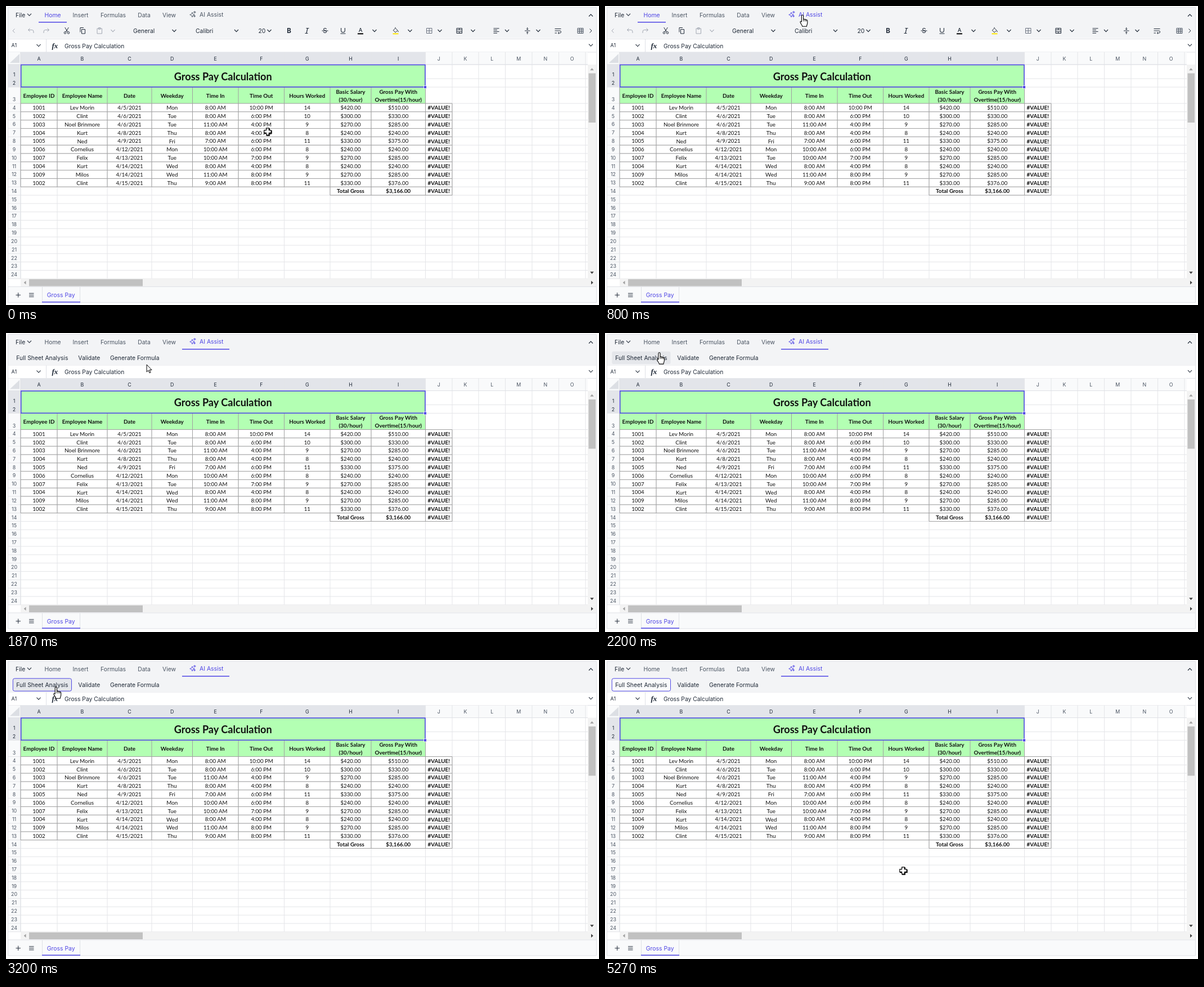
Recreate the animation shown at these times as an HTML page. Size 1054 by 531 pixels, loop 8 s.

```html
<!DOCTYPE html>
<html lang="en">
<head>
<meta charset="utf-8">
<title>Spreadsheet</title>
<style>
html, body { margin: 0; width: 100%; height: 100%; overflow: hidden; background: #fff; }
svg { display: block; width: 1054px; height: 531px; font-family: Inter, sans-serif; }
.cell { font-family: Lato, Carlito, sans-serif; }
</style>
</head>
<body>
<svg id="stage" viewBox="0 0 1054 531"></svg>
<script>
const NS = 'http://www.w3.org/2000/svg';
const INK = '#1f2937', TAB = '#4b5563', PALE = '#a3a8b3', ACCENT = '#4f46e5';
const BAR = '#f3f4f6', HEAD = '#f9fafb', ON = '#e3e5ea', EDGE = '#dfe1e6', GRID = '#e4e5e8', CELL = '#a0a0a0';
const LOOP = 8000;

function add(parent, tag, attrs, text) {
  const el = document.createElementNS(NS, tag);
  for (const k in attrs) el.setAttribute(k, attrs[k]);
  if (text !== undefined) el.textContent = text;
  parent.appendChild(el);
  return el;
}
const group = parent => add(parent, 'g', {});
const rect = (g, x, y, width, height, fill, more) => add(g, 'rect', { x, y, width, height, fill, ...more });
const line = (g, d, stroke = INK, w = 1, more) => add(g, 'path', { d, stroke, 'stroke-width': w, fill: 'none', ...more });
const fillPath = (g, d, fill) => add(g, 'path', { d, fill });
// y is the middle of the capitals
const label = (g, s, x, y, size, fill = INK, more) =>
  add(g, 'text', { x, y: y + size * 0.36, 'font-size': size, fill, ...more }, s);
const mid = { 'text-anchor': 'middle' };
const chevron = (g, x, y, color = INK) =>
  line(g, `M${x - 3.5} ${y - 1.8}l3.5 3.6 3.5-3.6`, color, 1.1);

const stage = document.getElementById('stage');
const sheet = group(stage);
const top_ = group(stage);
const homeBar = group(stage);
const aiBar = group(stage);

// ---- ribbon tabs
rect(top_, 3, 2, 1047, 55, BAR);
line(top_, 'M3.5 60V2.5H1049.5V60', EDGE);
label(top_, 'File', 17, 16, 10.4);
chevron(top_, 41.5, 15.5);
const homeTab = label(top_, 'Home', 83, 16, 10.4, TAB, mid);
[['Insert', 132.5], ['Formulas', 190.5], ['Data', 245.5], ['View', 290]]
  .forEach(([s, x]) => label(top_, s, x, 16, 10.4, TAB, mid));
const aiTab = group(top_);
label(aiTab, 'AI Assist', 344, 15, 10.4, 'inherit');
const star = (x, y, r) => {
  const k = r * 0.28;
  return `M${x} ${y - r}l${k} ${r - k} ${r - k} ${k} ${k - r} ${k} ${-k} ${r - k} ${-k} ${k - r} ${k - r} ${-k} ${r - k} ${-k}z`;
};
add(aiTab, 'path', { d: star(331, 15.5, 4.3) + star(335.3, 11, 2) + star(335, 18, 1.6), fill: 'none', stroke: 'currentColor', 'stroke-width': 0.9 });
const marker = rect(top_, 58, 28, 50, 1.5, ACCENT);
line(top_, 'M1036 18.5l3.5-3.6 3.5 3.6', INK, 1.1);

// ---- home toolbar
const h = homeBar;
line(h, 'M15.5 40.5l-3.5 3.5 3.5 3.5', PALE);
line(h, 'M42.5 39.5l-3 3 3 3M39.5 42.5h7q2.5 0 2.5 3.5v2', PALE);
line(h, 'M73.5 39.5l3 3-3 3M76.5 42.5h-7q-2.5 0-2.5 3.5v2', PALE);
line(h, 'M106.3 46.2l5-8.2M109.7 46.2l-5-8.2');
[105, 111].forEach(cx => add(h, 'circle', { cx, cy: 47.5, r: 1.8, fill: 'none', stroke: INK }));
line(h, 'M134.5 41.5h6v7.5h-6zM132 46.5v-8h6');
line(h, 'M162 40h8.5v9H162zM164.5 38.6h3.5v2.6h-3.5z', PALE);
chevron(h, 190, 44, PALE);
label(h, 'General', 226, 44, 10.4);
label(h, 'Calibri', 337, 44, 10.4);
label(h, '20', 448.5, 44, 10.4);
[299, 409.5, 468, 655, 718, 771, 830, 890.5, 946].forEach(x => chevron(h, x, 43.8));
label(h, 'B', 503, 43.7, 11.5, INK, { ...mid, 'font-weight': 700 });
line(h, 'M533.5 39.5h5M531.5 48.5h5M536 39.5l-2 9', INK, 1.2);
label(h, 'S', 567, 44, 11.5, INK, mid);
line(h, 'M561.5 44h11');
line(h, 'M595.6 39v4.3a3.4 3.4 0 0 0 6.8 0V39M594.5 49h9', INK, 1.1);
label(h, 'A', 630, 43, 9.5, INK, { ...mid, 'font-weight': 500 });
rect(h, 625, 48.3, 10, 2, '#000');
line(h, 'M688.3 43.3l3.8-4 4 4-4 3.6zM692 39.3v-1.5M697 44v2.2');
rect(h, 687.5, 48.3, 10, 2, '#ffe500');
line(h, 'M747.5 39.5h9.5v9h-9.5zM752.2 39.5v9M747.5 44h9.5', '#6b7280');
line(h, 'M801 39.5h9.5v9H801zM801 42.3h9.5M801 45.7h9.5M805.7 39.5v2.8M805.7 45.7v2.8');
line(h, 'M866.5 39.8h10M866.5 42.6h6.5M866.5 45.4h10M866.5 48.2h6.5');
line(h, 'M922 44h9.5M926.7 38v4M925 40.5l1.7 1.7 1.7-1.7M926.7 50v-4M925 47.5l1.7-1.7 1.7 1.7');
line(h, 'M975.5 40.5h11M975.5 44h9a2 2 0 0 1 0 4h-3M975.5 48h3.5M983 46.3l-1.8 1.7 1.8 1.7');
line(h, 'M1016 39.5h10v9h-10zM1016 42.5h10M1016 45.5h10M1019.5 39.5v9M1023 39.5v9', TAB);
line(h, 'M1037.5 40.5l3.5 3.5-3.5 3.5');

// ---- assistant toolbar
const button = rect(aiBar, 12.3, 32.8, 104.2, 22.4, 'none', { rx: 3 });
label(aiBar, 'Full Sheet Analysis', 18.3, 44, 10.4);
label(aiBar, 'Validate', 128.3, 44, 10.4);
label(aiBar, 'Generate Formula', 185, 44, 10.4);

// ---- formula bar
rect(sheet, 3, 58, 1047, 469, '#fff');
line(sheet, 'M3 58.5H1050M71.5 59V82M3 82H1050', EDGE);
label(sheet, 'A1', 9.5, 70, 9);
chevron(sheet, 58, 70);
add(sheet, 'text', { x: 81.5, y: 74.5, 'font-size': 13, fill: INK, 'font-style': 'italic', 'font-family': 'Liberation Serif, serif', 'font-weight': 700 }, 'fx');
label(sheet, 'Gross Pay Calculation', 104, 71, 10.3);
chevron(sheet, 1039.5, 69.5);

// ---- grid
const cols = [26, 91, 180, 259, 331.5, 413, 494.5, 576, 649, 745.5, 793, 840, 887.5, 935, 982.5, 1030];
const rows = [104, 129, 144];
for (let i = 0; i < 22; i++) rows.push(173 + i * 14.82);
const end = rows[24];
const centre = c => (cols[c] + cols[c + 1]) / 2;

rect(sheet, 3, 82, 1031, 22, HEAD);
rect(sheet, 3, 104, 23, end - 104, HEAD);
rect(sheet, 26, 82, 719.5, 22, ON);
rect(sheet, 3, 104, 23, 40, ON);
fillPath(sheet, 'M24 85V101H7z', '#dcdfe4');
cols.forEach(x => line(sheet, `M${x} 82V${end}`, GRID));
rows.forEach(y => line(sheet, `M3 ${y}H1034`, GRID));
line(sheet, `M26 82V${end}M3 104H1034`, EDGE);
for (let c = 0; c < 15; c++) label(sheet, 'ABCDEFGHIJKLMNO'[c], centre(c), 93.3, 8.9, c < 9 ? INK : TAB, mid);
for (let r = 0; r < 24; r++) label(sheet, r + 1, 14.5, rows[r + 1] - 7.2, 8.9, r < 2 ? INK : TAB, mid);

rect(sheet, 26, 104, 719.5, 69, '#b3ffb3');
line(sheet, `M26 144H745.5` + rows.slice(3, 14).map(y => `M26 ${y}H793`).join('') + `M576 ${rows[14]}H793`, CELL);
cols.slice(0, 11).forEach((x, c) =>
  line(sheet, `M${x} ${c > 9 ? 173 : 144}V${rows[c > 6 ? 14 : 13]}`, CELL));

const put = (s, c, y, bold, size = /^[\d$]/.test(s) ? 9.7 : 9.9) =>
  label(sheet, s, centre(c), y, size, '#111', { ...mid, class: 'cell', 'font-weight': bold ? 700 : 400 });
label(sheet, 'Gross Pay Calculation', 385.7, 125, 18.1, '#111', { ...mid, class: 'cell', 'font-weight': 700 });
['Employee ID', 'Employee Name', 'Date', 'Weekday', 'Time In', 'Time Out', 'Hours Worked']
  .forEach((s, c) => put(s, c, 159.3, true));
put('Basic Salary', 7, 152, true);
put('(30/hour)', 7, 166, true);
put('Gross Pay With', 8, 152, true);
put('Overtime(15/hour)', 8, 166, true);

const staff = `1001|Lev Morin|5|Mon|8|10 PM|14|420|510
1002|Clint|6|Tue|8|6 PM|10|300|330
1003|Noel Brinmore|6|Tue|11|4 PM|9|270|285
1004|Kurt|8|Thu|8|4 PM|8|240|240
1005|Ned|9|Fri|7|6 PM|11|330|375
1006|Cornelius|12|Mon|10|6 PM|8|240|240
1007|Felix|13|Tue|10|7 PM|9|270|285
1004|Kurt|14|Wed|8|4 PM|8|240|240
1009|Milos|14|Wed|11|8 PM|9|270|285
1002|Clint|15|Thu|9|8 PM|11|330|376`;
const show = [
  s => s, s => s, s => `4/${s}/2021`, s => s, s => `${s}:00 AM`,
  s => s.replace(' ', ':00 '), s => s, s => `$${s}.00`, s => `$${s}.00`
];
staff.split('\n').forEach((row, r) =>
  row.split('|').forEach((s, c) => put(show[c](s), c, rows[r + 3] + 7.7)));
for (let r = 3; r < 14; r++) put('#VALUE!', 9, rows[r] + 7.7, true);
put('Total Gross', 7, rows[13] + 7.7, true);
put('$3,166.00', 8, rows[13] + 7.7, true);

rect(sheet, 26.7, 104.5, 718.3, 39.3, 'none', { stroke: ACCENT, 'stroke-width': 1.6 });
rect(sheet, 742.5, 141.5, 5, 5, ACCENT, { stroke: '#fff', 'stroke-width': 0.8 });

// ---- scroll bars
rect(sheet, 1034, 104, 15.5, end - 104, '#f3f3f3');
rect(sheet, 26, end, 1023.5, 13.8, '#f3f3f3');
rect(sheet, 1035.5, 119.5, 12.5, 87.5, '#c1c1c1');
rect(sheet, 41, 485.2, 202, 12.3, '#c1c1c1');
fillPath(sheet, 'M1038.2 114.3l3.3-4 3.3 4zM35.5 488l-3.8 3.3 3.8 3.3z', '#a0a0a0');
fillPath(sheet, 'M1038.2 471.8l3.3 4 3.3-4zM1040 488l3.8 3.3-3.8 3.3z', '#404040');

// ---- sheet tabs
rect(sheet, 3, 498, 1047, 28.5, HEAD);
line(sheet, 'M3 498.5H1050M64.5 499V526M131.5 499V526', EDGE);
line(sheet, 'M17.5 513.3h8.4M21.7 509.1v8.4');
line(sheet, 'M41 510.3h8.5M41 513.3h8.5M41 516.3h8.5');
label(sheet, 'Gross Pay', 97.7, 513.3, 10.4, ACCENT, mid);
line(sheet, 'M3.5 58V526.5H1049.5V58', EDGE);
rect(sheet, 64, 525, 68, 1.5, ACCENT);

// ---- pointers
const outlined = (g, d, w = 1) =>
  add(g, 'path', { d, fill: '#fff', stroke: '#000', 'stroke-width': w, 'stroke-linejoin': 'round' });
const pointers = { hand: group(stage), cross: group(stage), arrow: group(stage) };
outlined(pointers.hand, 'M-1.6 1.6C-1.6-.6 1.6-.6 1.6 1.6V8C1.8 6.8 4 7 4.2 8.3 4.6 7.4 6.6 7.8 6.7 9 7.2 8.4 8.8 8.8 8.8 10.2V14C8.8 17 7.4 17.5 7.4 20.3H-.2C-.2 18-3.8 15-4 12.4-4 11-2.4 10.8-1.6 12.2Z', 1.1);
line(pointers.hand, 'M1.6 8v3.3M4.2 8.3v3M6.7 9v2.5', '#000', 0.9);
const plus = 'M-2.4-6.2h4.8v3.8h3.8v4.8h-3.8v3.8h-4.8v-3.8h-3.8v-4.8h3.8z';
add(pointers.cross, 'path', { d: plus, transform: 'translate(.9 .9)', stroke: '#000', 'stroke-width': 1.2 });
outlined(pointers.cross, plus, 1.2);
outlined(pointers.arrow, 'M0 0V13l3-2.8 2 4.6 2-.9-2-4.4H9z');

// each move: start, end, steps, then points as [share, x, y]
const moves = [
  [70, 800, 10, [[0, 465, 223], [.2, 452, 202], [.5, 404, 115], [.8, 358, 32], [1, 351, 16]]],
  [1670, 2330, 11, [[0, 351, 16], [.35, 255, 55], [.6, 165, 76], [.82, 96, 34.5], [1, 74, 44]]],
  [2600, 2600, 1, [[0, 74, 44], [1, 79, 45]]],
  [2870, 3670, 13, [[0, 79, 45], [.3, 84, 46], [.465, 89, 48], [.6, 170, 110], [.8, 420, 300], [.92, 532, 379], [1, 511, 380]]],
  [3800, 4000, 4, [[0, 511, 380], [1, 529, 373]]],
  [5270, 5270, 1, [[0, 529, 373], [1, 530, 374]]]
];

function along(points, p) {
  let i = 1;
  while (i < points.length - 1 && p > points[i][0]) i++;
  const [a, b] = [points[i - 1], points[i]];
  const k = Math.min(1, (p - a[0]) / (b[0] - a[0]));
  return [a[1] + (b[1] - a[1]) * k, a[2] + (b[2] - a[2]) * k];
}

function pointerAt(t) {
  let now = moves[0];
  for (const m of moves) if (t >= m[0]) now = m;
  const [t0, t1, n, points] = now;
  if (t < t0) return along(points, 0);
  const gap = n > 1 ? (t1 - t0) / (n - 1) : 1;
  const done = Math.min(n, Math.floor((t - t0 + 5) / gap) + 1);
  return along(points, done / n);
}

const visible = (el, on) => el.setAttribute('visibility', on ? 'visible' : 'hidden');

function draw(t) {
  const [x, y] = pointerAt(t);
  const ai = t >= 1470, settled = t >= 1530;
  const onTab = y < 30 && x > 313 && x < 398;
  const onButton = ai && x > 12 && x < 117 && y > 32 && y < 56;
  const kind = onTab || onButton ? 'hand' : y > 80 ? 'cross' : 'arrow';
  for (const k in pointers) visible(pointers[k], k === kind);
  pointers[kind].setAttribute('transform', `translate(${x} ${y})`);

  visible(homeBar, !ai);
  visible(aiBar, ai);
  sheet.setAttribute('transform', `translate(0 ${ai ? -1.5 : 0})`);
  homeTab.setAttribute('fill', ai ? TAB : ACCENT);
  const tint = settled || onTab ? ACCENT : TAB;
  aiTab.setAttribute('fill', tint);
  aiTab.setAttribute('color', tint);
  marker.setAttribute('x', settled ? 313 : ai ? 78 : 58);
  marker.setAttribute('width', settled ? 84 : ai ? 52 : 50);
  button.setAttribute('fill', onButton ? '#e5e7eb' : t >= 2870 ? '#f9fafb' : 'none');
  button.setAttribute('stroke', t >= 2870 ? ACCENT : 'none');
}

function tick() {
  draw(performance.now() % LOOP);
  requestAnimationFrame(tick);
}
tick();
</script>
</body>
</html>
```
